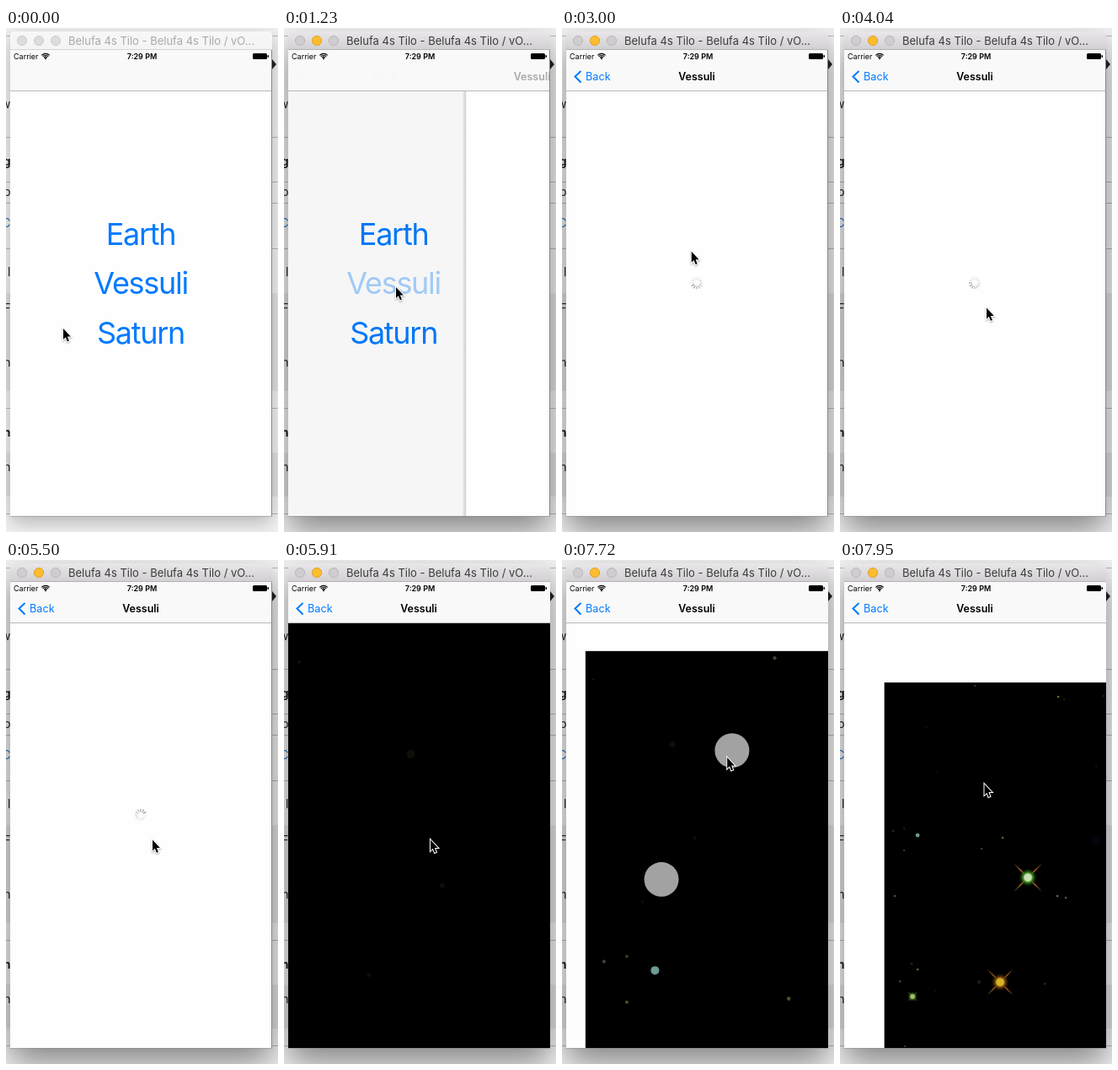
Recreate the animation shown at these times as an HTML page with a canvas. Size 323 by 597 pixels, loop 8 s.

```html
<!DOCTYPE html>
<html lang="en">
<head>
<meta charset="utf-8">
<title>Simulator</title>
<style>
html, body { margin: 0; width: 100%; height: 100%; overflow: hidden; }
canvas { display: block; }
</style>
</head>
<body>
<canvas id="stage" width="323" height="597"></canvas>
<script>
const ctx = document.getElementById('stage').getContext('2d');
const LOOP = 8000, BLUE = '#007aff';
const WIN = { x: 5, y: 4, w: 311, h: 574, top: 26, content: 74.5, bottom: 578 };
const CENTER = { x: 160, y: 302 };
const ACTIVATE = 950, PRESS = 1000, PUSH = 1168, LOADED = 5910;
const TOUCH_ON = 7000, TOUCH_OFF = 7900, PINCH = 7550, PINCH_TIME = 390, MIN_ZOOM = .34;

// time, x, y of the pointer tip
const POINTER = [
  [0, 67.5, 355.5], [50, 67.5, 355.5], [60, 67.5, 356.5], [190, 67.5, 356.5], [650, 132.5, 306.5],
  [1710, 132.5, 306.5], [1950, 127, 318], [2250, 161, 290], [2540, 160, 254], [2800, 149, 258],
  [3000, 153, 264], [3200, 208, 322], [3400, 179, 333], [3520, 173.5, 331], [6700, 173.5, 331],
  [7335, 214, 220], [7390, 213, 210.5], [7550, 215, 209], [7940, 171, 265], [8000, 171, 265]
];

// x, y, radius, colour, laid out at the smallest zoom
const STARS = [
  [102, 198, 1.7, '#0f0d05'], [114.7, 251, 1, '#0f0d0a'], [57, 161, .6, '#141414'], [85, 287, .8, '#0d0d0d'],
  [160, 149, 1, '#3c4a30'], [259, 162, 1.3, '#6a7030'], [266, 165, .9, '#333322'], [313, 161, 1, '#332e22'],
  [304, 244, .9, '#222222'], [92, 326, 2.4, '#6f9a96'], [63, 321, 1, '#3c4430'], [76, 318, .9, '#403820'],
  [76, 344, 1, '#4a4a28'], [168, 342, 1.1, '#4d5028'], [193, 329, 1.3, '#5a6a30'], [65, 398, 1.4, '#445044'],
  [258, 398, 1.3, '#607050'], [268, 400, 1.3, '#5a5a48'], [92, 485, 1.4, '#5a6430'], [85, 478, 1.6, '#1c2218'],
  [71, 499, 1.3, '#3c4830'], [165, 500, 2, '#1c1c16'], [243, 502, 1, '#443c22'], [77, 576, 1, '#445030'],
  [303, 332, 6, '#06040b'], [113, 510, .8, '#222222']
];

const clamp = (v, lo = 0, hi = 1) => Math.min(hi, Math.max(lo, v));
const lerp = (a, b, u) => a + (b - a) * u;

function pointerAt(t) {
  const i = Math.max(1, POINTER.findIndex(k => k[0] >= t));
  const [t0, x0, y0] = POINTER[i - 1], [t1, x1, y1] = POINTER[i];
  const u = clamp((t - t0) / (t1 - t0));
  return { x: lerp(x0, x1, u), y: lerp(y0, y1, u) };
}

// Critically damped spring
function pushProgress(t) {
  const x = Math.max(0, t - PUSH) * .0183;
  return x > 9.5 ? 1 : 1 - (1 + x) * Math.exp(-x);
}

// Overscroll resistance of a scroll view
const rubber = (d, size) => size * (1 - 1 / (d * .55 / size + 1));

function rect(x, y, w, h, fill) {
  ctx.fillStyle = fill;
  ctx.fillRect(x, y, w, h);
}

function circle(x, y, r, fill, stroke) {
  ctx.beginPath();
  ctx.arc(x, y, r, 0, 7);
  ctx.fillStyle = fill;
  ctx.fill();
  if (stroke) line(stroke, 1);
}

function line(color, width) {
  ctx.strokeStyle = color;
  ctx.lineWidth = width;
  ctx.stroke();
}

function path(points) {
  ctx.beginPath();
  points.forEach(([x, y]) => ctx.lineTo(x, y));
}

function text(str, x, y, size, { weight = 400, color = '#000', align = 'left', spacing = 0, alpha = 1 } = {}) {
  ctx.save();
  ctx.globalAlpha *= alpha;
  ctx.font = `${weight} ${size}px Inter, sans-serif`;
  ctx.letterSpacing = spacing + 'px';
  ctx.textAlign = align;
  ctx.fillStyle = color;
  ctx.fillText(str, x, y);
  ctx.restore();
}

function drawDesktop(active) {
  rect(0, 0, 323, 597, '#f3f3f3');
  rect(0, 314, 323, 116, '#e4e4e4');
  rect(0, 503, 323, 52, '#e4e4e4');
  for (const y of [9, 129, 182, 207, 261, 450, 575]) rect(0, y, 323, 1, '#b8b8b8');
  const scraps = [['w', 95], ['g', 163, 700], ['b', 199], ['C', 236, 400, '#2a6fc0'], ['l', 294],
    ['F', 337], ['h', 401], ['n', 484, 700], ['h', 525]];
  for (const [s, y, weight = 400, color = '#222'] of scraps) text(s, 5.5, y, 14, { weight, color, align: 'right' });
  path([[316, 37], [321, 43], [316, 49]]);
  ctx.fillStyle = '#222';
  ctx.fill();

  ctx.save();
  ctx.shadowColor = active ? 'rgba(0,0,0,.46)' : 'rgba(0,0,0,.28)';
  ctx.shadowBlur = active ? 38 : 24;
  ctx.shadowOffsetY = active ? 17 : 7;
  ctx.beginPath();
  ctx.roundRect(WIN.x, WIN.y, WIN.w, WIN.h, [5, 5, 0, 0]);
  ctx.fillStyle = '#fff';
  ctx.fill();
  ctx.restore();
  rect(WIN.x, WIN.top, WIN.w, WIN.bottom - WIN.top + .5, '#8a8a8a');
}

function drawTitleBar(active) {
  const g = ctx.createLinearGradient(0, 4, 0, 26);
  g.addColorStop(0, active ? '#e9e7e9' : '#f7f7f7');
  g.addColorStop(1, active ? '#d1cfd1' : '#f4f4f4');
  ctx.beginPath();
  ctx.roundRect(WIN.x, WIN.y, WIN.w, 22, [5, 5, 0, 0]);
  ctx.fillStyle = g;
  ctx.fill();
  rect(WIN.x, 25, WIN.w, 1, active ? '#b4b2b4' : '#d4d4d4');
  [19, 39, 59].forEach((x, i) => active && i === 1
    ? circle(x, 15, 5.6, '#fdbd2e', '#e0a028')
    : circle(x, 15, 5.6, active ? '#cfcdcf' : '#dcdcdc', active ? '#b9b7b9' : '#cdcdcd'));
  text('Belufa 4s Tilo - Belufa 4s Tilo / vO...', 74, 20, 13, { color: active ? '#3c3c3c' : '#a9a9a9' });
}

function drawMenu(t, p) {
  const x = CENTER.x - p * WIN.w * .3;
  const item = (s, y, alpha = 1) => text(s, x, y, 36, { color: BLUE, align: 'center', spacing: -1.3, alpha });
  rect(WIN.x, WIN.content, WIN.w, 504, '#fefefe');
  item('Earth', 257);
  item('Vessuli', 315, t >= PRESS ? .35 : 1);
  item('Saturn', 374);
  rect(WIN.x, WIN.content, WIN.w, 504, `rgba(0,0,0,${.1 * p})`);
}

function drawSpinner(t, cx) {
  const step = Math.floor(t * 12 / 1000 + .6);
  ctx.lineCap = 'round';
  for (let i = 0; i < 12; i++) {
    const a = (step - i + 5) * Math.PI / 6, c = Math.cos(a), s = Math.sin(a);
    const shade = Math.round(lerp(145, 228, Math.min(1, i / 7)));
    path([[cx + c * 4, CENTER.y + s * 4], [cx + c * 6.8, CENTER.y + s * 6.8]]);
    line(`rgb(${shade},${shade},${shade})`, 1.2);
  }
  ctx.lineCap = 'butt';
}

function drawBrightStar(x, y, r, reach, core, glow, spike) {
  for (const a of [1, 3, 5, 7]) {
    const dx = Math.cos(a * Math.PI / 4) * reach, dy = Math.sin(a * Math.PI / 4) * reach;
    const fade = ctx.createLinearGradient(x, y, x + dx, y + dy);
    fade.addColorStop(.45, spike);
    fade.addColorStop(1, '#000');
    path([[x, y], [x + dx, y + dy]]);
    line(fade, 1.6);
  }
  const g = ctx.createRadialGradient(x, y, 0, x, y, r * 2.3);
  g.addColorStop(0, core);
  g.addColorStop(.35, core);
  g.addColorStop(.5, glow);
  g.addColorStop(1, 'transparent');
  circle(x, y, r * 2.3, g);
}

function drawPhoto(t) {
  const zoom = lerp(1, MIN_ZOOM, clamp((t - PINCH) / PINCH_TIME));
  const left = WIN.x + rubber((CENTER.x - WIN.x) * (1 - zoom), 311);
  const top = 74 + rubber((CENTER.y - 74) * (1 - zoom), 504);
  rect(left, top, 1000, 1500, '#000');
  ctx.save();
  ctx.translate(left, top);
  ctx.scale(zoom / MIN_ZOOM, zoom / MIN_ZOOM);
  ctx.translate(-52.5, -145);
  for (const star of STARS) circle(...star);
  drawBrightStar(223, 376, 5, 24, '#c8e0b4', '#3c8a1e', '#a8642a');
  drawBrightStar(190, 500, 5, 22, '#d8b428', '#7a4a0c', '#a8601c');
  drawBrightStar(86, 517, 2.8, 8, '#a0c070', '#3c6a1e', '#5a6a28');
  ctx.restore();
}

function drawDetail(t, p) {
  const x = WIN.x + WIN.w * (1 - p);
  if (p < 1) {
    const g = ctx.createLinearGradient(x - 5, 0, x, 0);
    g.addColorStop(0, 'rgba(0,0,0,0)');
    g.addColorStop(1, 'rgba(0,0,0,.18)');
    rect(x - 5, WIN.content, 5, 504, g);
  }
  rect(x, WIN.content, WIN.w, 504, '#fefefe');
  if (t < LOADED) drawSpinner(t, x + CENTER.x - WIN.x);
  else drawPhoto(t);
}

function drawStatusBar() {
  text('Carrier', 9, 37, 9);
  text('7:29 PM', 161.5, 37, 9, { weight: 600, align: 'center' });
  for (const r of [2.6, 4.6, 6.6]) {
    ctx.beginPath();
    ctx.arc(47, 37, r, -Math.PI * .75, -Math.PI * .25);
    line('#000', 1.2);
  }
  circle(47, 36.2, 1, '#000');
  ctx.beginPath();
  ctx.roundRect(293, 30, 17, 7, 1.5);
  ctx.roundRect(310.5, 32, 1.5, 3, .7);
  ctx.fill();
}

function drawNavBar(p) {
  rect(WIN.x, WIN.top, WIN.w, 48.5, '#f9f9f9');
  rect(WIN.x, 74, WIN.w, 1, '#b8b8b8');
  drawStatusBar();
  if (p === 0) return;
  const fade = clamp(p * 1.45 - .45);
  text('Vessuli', CENTER.x + 198 * (1 - p), 62, 12.5, { weight: 600, align: 'center', alpha: p });
  text('Back', 28 + 114 * (1 - p), 62, 12.7, { color: BLUE, alpha: fade });
  ctx.globalAlpha = fade;
  path([[22.5, 51], [15.5, 57.5], [22.5, 64.5]]);
  line(BLUE, 2);
  ctx.globalAlpha = 1;
}

function drawTouches(t) {
  const { x, y } = pointerAt(t - 55);
  circle(x, y, 20.5, '#a2a2a2');
  circle(2 * CENTER.x - x, 2 * CENTER.y - y, 20.5, '#a2a2a2');
}

function drawPointer({ x, y }) {
  ctx.save();
  ctx.translate(x, y);
  path([[.5, .5], [.5, 13.5], [3.3, 10.8], [5.4, 15.8], [7.4, 14.9], [5.4, 10], [9.4, 10]]);
  ctx.closePath();
  ctx.shadowColor = 'rgba(0,0,0,.35)';
  ctx.shadowBlur = 2;
  ctx.shadowOffsetY = 1;
  line('#fff', 2);
  ctx.shadowColor = 'transparent';
  ctx.fillStyle = '#000';
  ctx.fill();
  ctx.restore();
}

function draw(t) {
  const active = t >= ACTIVATE, p = pushProgress(t);
  drawDesktop(active);
  drawTitleBar(active);
  ctx.save();
  ctx.beginPath();
  ctx.rect(WIN.x, WIN.top, WIN.w - (t < LOADED ? 1 : 0), WIN.bottom - WIN.top);
  ctx.clip();
  if (p < 1) drawMenu(t, p);
  if (p > 0) drawDetail(t, p);
  drawNavBar(p);
  if (t >= TOUCH_ON && t < TOUCH_OFF) drawTouches(t);
  ctx.restore();
  drawPointer(pointerAt(t));
}

const start = performance.now();
function tick() {
  draw((performance.now() - start) % LOOP);
  requestAnimationFrame(tick);
}
tick();
</script>
</body>
</html>
```
